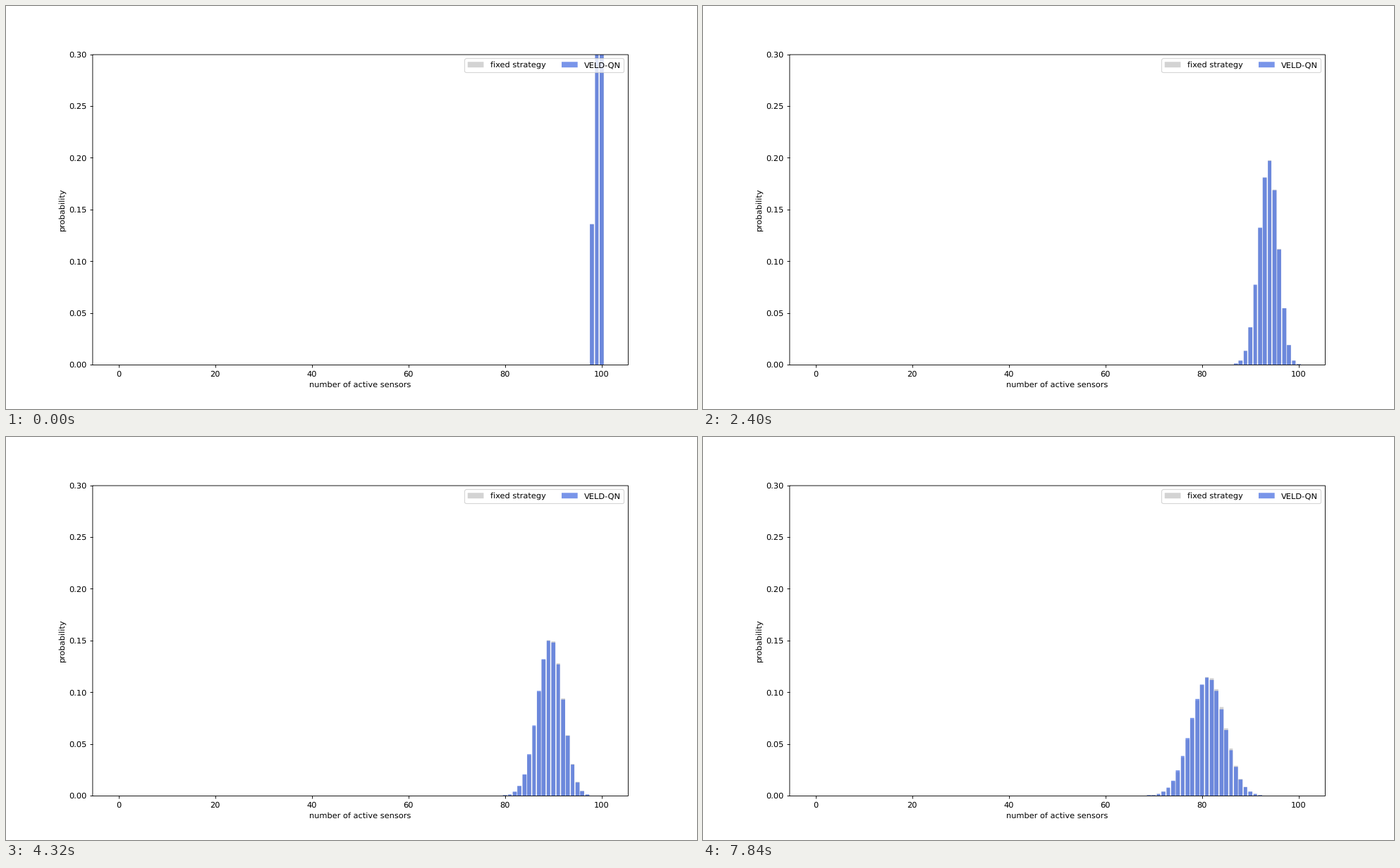
Recreate the animation shown at these times as a matplotlib script. Size 980 by 572 pixels, loop 8 s.

```python
import numpy as np
import matplotlib.pyplot as plt
from matplotlib.animation import FuncAnimation
from matplotlib.patches import Rectangle

DPI = 980 / 12
SENSORS = 100
FRAMES = 50
FAIL = 0.3683         # chance of losing a sensor in one step
DRIFT = 2e-4          # extra chance per sensor already lost
XLIM = (-5.44, 105.44)
YMAX = 0.3
FIG_W, FIG_H = 1200, 700    # layout grid of the whole figure
GRID_W, GRID_H = 930, 539   # part of it inside the axes

plt.rcParams["font.family"] = "DejaVu Sans"
plt.rcParams["text.hinting"] = "none"


def evolve(drift):
    """Distributions of the active count, one row per step."""
    lost = np.arange(SENSORS + 1)
    fail = FAIL + drift * lost
    prob = np.zeros(SENSORS + 1)
    prob[0] = 1
    rows = [prob]
    for _ in range(FRAMES + 1):
        nxt = prob * (1 - fail)
        nxt[1:] += (prob * fail)[:-1]
        prob = nxt
        rows.append(prob)
    return np.array(rows)[:, ::-1]


def snap(value, span, cells):
    return np.floor(value / span * cells + 0.5) * span / cells


fixed = evolve(0)
adaptive = evolve(DRIFT)

fig, ax = plt.subplots(figsize=(980.01 / DPI, 572.01 / DPI), dpi=DPI)
x = np.arange(SENSORS + 1)
span = XLIM[1] - XLIM[0]
left = XLIM[0] + snap(x - 0.4 - XLIM[0], span, GRID_W)
right = XLIM[0] + snap(x + 0.4 - XLIM[0], span, GRID_W)


def make_bars(color, alpha, label):
    return ax.bar(left, 0 * x, right - left, align="edge", color=color,
                  alpha=alpha, label=label, linewidth=0, snap=False)


series = [
    (make_bars("lightgray", 1, "fixed strategy"), fixed),
    (make_bars("royalblue", 0.7, "VELD-QN"), adaptive),
]
ax.set_xlim(*XLIM)
ax.set_ylim(0, YMAX)
ax.set_xlabel("number of active sensors")
ax.set_ylabel("probability")
legend = ax.legend(loc="upper right", ncol=2)
for patch in legend.get_patches():
    patch.set_snap(False)

# The frame line runs through cell centres, half a cell off the axes edge.
ax.spines[:].set_visible(False)
fig.add_artist(Rectangle((150.5 / FIG_W, 76.5 / FIG_H),
                         GRID_W / FIG_W, GRID_H / FIG_H, fill=False,
                         linewidth=0.8, snap=False,
                         transform=fig.transFigure))


def update(frame):
    for bars, rows in series:
        for bar, height in zip(bars, snap(rows[frame + 2], YMAX, GRID_H)):
            bar.set_height(height)
    return []


def init():
    return update(0)


anim = FuncAnimation(fig, update, frames=FRAMES, init_func=init,
                     interval=160, repeat=True, repeat_delay=0)
plt.show()
```
